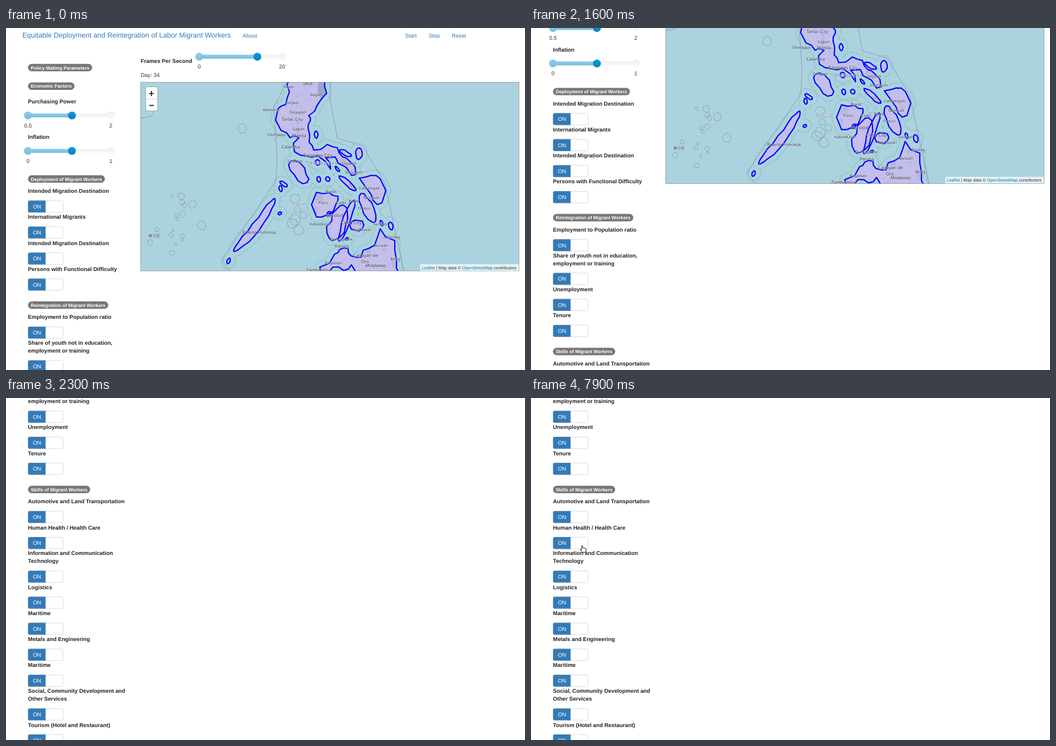
Recreate the animation shown at these times as an HTML page. Size 921 by 608 pixels, loop 8000 ms.

```html
<!DOCTYPE html>
<html lang="en">
<head>
<meta charset="utf-8">
<title>Labor Migration Dashboard</title>
<style>
html, body { margin: 0; width: 100%; height: 100%; overflow: hidden; background: #fff; }
svg { display: block; width: 921px; height: 608px; font-family: "Liberation Sans", Arial, sans-serif; text-rendering: geometricPrecision; }
.map text { font-family: "Noto Sans", "Noto Sans CJK SC", "Noto Sans CJK", sans-serif; }
</style>
</head>
<body>
<svg viewBox="0 0 921 608">
  <defs>
    <linearGradient id="track" x2="0" y2="1"><stop stop-color="#f0f0f0"/><stop offset="1" stop-color="#f9f9f9"/></linearGradient>
    <linearGradient id="range" x2="0" y2="1"><stop stop-color="#89cdef"/><stop offset="1" stop-color="#81bcda"/></linearGradient>
    <linearGradient id="knob" x2="0" y2="1"><stop stop-color="#149bdf"/><stop offset="1" stop-color="#0480be"/></linearGradient>
    <clipPath id="frame"><rect x="239" y="96.5" width="671.3" height="335.4"/></clipPath>
    <clipPath id="switch"><rect width="62.6" height="21.2" rx="2.8"/></clipPath>
  </defs>
  <g id="page"></g>
  <path id="arrow" d="M.5 .5V12L3.2 9.5 5.2 14 7.2 13.1 5.2 8.9H9Z" fill="#fff" stroke="#111"/>
  <path id="hand" d="M3.4 8V1.4Q3.4.5 4.3.5T5.3 1.4V4.6Q6.8 4 7.3 5 8.7 4.5 9.3 5.5 10.8 5 11.4 6.3V9.2L10.3 12.6H4.5L.8 8.2Q.5 6.8 1.8 7Z" fill="#fff" stroke="#111"/>
</svg>
<script>
const NS = "http://www.w3.org/2000/svg";
const page = document.getElementById("page");

function el(parent, tag, attrs, content) {
  const n = document.createElementNS(NS, tag);
  for (const k in attrs) n.setAttribute(k, attrs[k]);
  if (content !== undefined) n.textContent = content;
  parent.appendChild(n);
  return n;
}
// Text placed by the vertical middle of its capitals
function text(parent, str, x, mid, size = 9.8, attrs = {}) {
  return el(parent, "text", { x, y: mid + size * 0.34, "font-size": size, fill: "#333", ...attrs }, str);
}
const bold = (str, x, mid) => text(page, str, x, mid, 9.8, { "font-weight": 700, fill: "#222" });
const link = (str, x, size = 9.8) => text(page, str, x, 13.2, size, { fill: "#337ab7" });

function badge(str, mid) {
  const r = el(page, "rect", { x: 39, y: mid - 6.6, height: 13.2, rx: 6.6, fill: "#777" });
  const t = text(page, str, 44, mid + 0.3, 8.4, { "font-weight": 700, fill: "#fff" });
  r.setAttribute("width", t.getComputedTextLength() + 10);
}
function slider(x, mid, value, lo, hi) {
  const bar = (width, fill) => el(page, "rect", { x, y: mid - 3.5, width, height: 7, rx: 2.8, fill });
  const dot = (dx, fill) => el(page, "circle", { cx: x + dx, cy: mid, r: 7, fill });
  const mark = (s, dx) => text(page, s, x + dx, mid + 18, 9.8, { "text-anchor": "middle" });
  bar(147, "url(#track)");
  bar(value, "url(#range)");
  dot(0, "url(#range)");
  dot(147, "url(#track)");
  dot(value, "url(#knob)");
  mark(lo, 0);
  mark(hi, 147);
}
function toggle(mid) {
  const box = el(page, "g", { transform: `translate(39.1 ${mid - 10.6})` });
  const strip = el(el(box, "g", { "clip-path": "url(#switch)" }), "g", {});
  ["#337ab7", "#fff", "#e6e6e6"].forEach((fill, i) => el(strip, "rect", { x: 31.4 * i, width: 31.4, height: 21.2, fill }));
  ["ON", "", "OFF"].forEach((s, i) => text(strip, s, 31.4 * i + 15.9, 10.7, 9.8, { fill: i ? "#333" : "#fff", "text-anchor": "middle" }));
  el(box, "rect", { x: 0.35, y: 0.35, width: 61.9, height: 20.5, rx: 2.5, fill: "none", stroke: "#ccc", "stroke-width": 0.7 });
  const edge = el(box, "path", { d: "M31.4 .35H2.8Q.35 .35 .35 2.8V18.4Q.35 20.85 2.8 20.85H31.4", fill: "none", stroke: "#2e6da4", "stroke-width": 0.7 });
  return off => {
    strip.setAttribute("transform", `translate(${-31.4 * off} 0)`);
    edge.setAttribute("opacity", off ? 0 : 1);
  };
}
// Stacked labels with a switch under each; "|" breaks a label in two lines
function rows(y, labels) {
  return labels.map(label => {
    const lines = label.split("|"), extra = lines.length - 1;
    lines.forEach((s, i) => bold(s, 39, y + i * 14 - extra * 0.4));
    y += extra * 13.6 + 46.25;
    return toggle(y - 18.7);
  });
}

/* Header and controls */
link("Equitable Deployment and Reintegration of Labor Migrant Workers", 29, 12.55);
link("About", 420);
link("Start", 708);
link("Step", 750);
link("Reset", 791);
bold("Frames Per Second", 239, 58.7);
slider(343, 51, 103, "0", "20");
text(page, "Day: 34", 239, 83.3);

badge("Policy Making Parameters", 70.4);
badge("Economic Factors", 103.3);
bold("Purchasing Power", 39, 131);
slider(39, 155.5, 78, "0.5", "2");
bold("Inflation", 39, 194);
slider(39, 218.5, 78, "0", "1");
badge("Deployment of Migrant Workers", 268.4);
rows(289.8, ["Intended Migration Destination", "International Migrants", "Intended Migration Destination", "Persons with Functional Difficulty"]);
badge("Reintegration of Migrant Workers", 492.6);
rows(514, ["Employment to Population ratio", "Share of youth not in education,|employment or training", "Unemployment", "Tenure"]);
badge("Skills of Migrant Workers", 730.6);
const skills = rows(752, ["Automotive and Land Transportation", "Human Health / Health Care", "Information and Communication|Technology", "Logistics", "Maritime", "Metals and Engineering", "Maritime", "Social, Community Development and|Other Services", "Tourism (Hotel and Restaurant)"]);

/* Coastlines */
let seed = 11;
const rnd = () => (seed = (seed * 16807) % 2147483647) / 2147483647;
const jit = size => (rnd() - 0.5) * size;
const ring = pts => "M" + pts.map(p => p.map(v => v.toFixed(1)).join(" ")).join("L") + "Z";

// Closed outline through key points, each side broken once by a random kink
function coast(keys) {
  const n = keys.match(/\d+/g).map(Number), pts = [];
  for (let i = 0; i < n.length; i += 2) {
    const [x, y, u, v] = [0, 1, 2, 3].map(k => n[(i + k) % n.length]), k = jit(0.4);
    pts.push([x, y], [(x + u) / 2 + (v - y) * k, (y + v) / 2 - (u - x) * k]);
  }
  return ring(pts);
}
// Ragged lens from one tip to the other, bowed sideways
function isle(x, y, u, v, width, bow = 0) {
  const len = Math.hypot(u - x, v - y), n = 6 + 2 * Math.round(len / 14), pts = [];
  for (let i = 0; i < n; i++) {
    const a = i * 2 * Math.PI / n, s = (1 - Math.cos(a)) / 2;
    const side = Math.sin(a) * width / 2 * (1 + jit(0.5)) + bow * Math.sin(s * Math.PI);
    pts.push([x + (u - x) * s - (v - y) / len * side, y + (v - y) * s + (u - x) / len * side]);
  }
  return ring(pts);
}
const north = coast("503 90 503 113 496 136 483 143 488 182 504 195 510 192 520 195 510 205 512 220 533 228 553 227 576 251 567 230 584 229 589 240 613 262 621 260 610 237 597 229 588 213 570 207 558 216 546 217 538 203 536 178 540 165 537 156 553 136 569 116 566 90");
const mindoro = isle(505, 237, 534, 275, 23);
const panay = coast("551 292 574 293 589 299 586 312 568 333 551 336");
const negros = isle(599, 315, 578, 378, 29);
const samar = coast("627 267 648 262 664 268 667 311 659 314 648 296");
const south = coast("556 440 557 425 583 402 592 394 607 392 612 405 630 408 634 395 654 386 664 357 690 378 693 412 700 440 626 440 613 421 599 431 580 425");
const slim = [
  isle(404, 397, 477, 303, 15, 5), isle(393, 419, 397, 409, 5), isle(486, 273, 499, 282, 7), isle(487, 280, 488, 291, 6), isle(483, 331, 489, 328, 5),
  isle(550, 183, 551, 196, 6), isle(553, 234, 553, 244, 9), isle(627, 213, 625, 234, 11), isle(592, 217, 613, 228, 8), isle(584, 246, 592, 255, 4),
  isle(554, 264, 556, 274, 6), isle(567, 268, 575, 269, 8), isle(591, 263, 621, 289, 9), isle(681, 345, 685, 359, 7), isle(665, 342, 668, 352, 5),
  isle(630, 294, 654, 346, 18), isle(618, 306, 591, 379, 13), isle(610, 351, 635, 350, 19), isle(570, 333, 576, 327, 6), isle(602, 375, 608, 375, 5)];
const land = [north, mindoro, panay, negros, samar, south, ...slim].join("");

/* Map */
el(page, "rect", { x: 239, y: 96.5, width: 671.3, height: 335.4, fill: "#aad3df" });
const map = el(page, "g", { class: "map", "clip-path": "url(#frame)" });
const shape = (d, stroke, width = 1, attrs = {}) =>
  el(map, "path", { d, fill: "none", stroke, "stroke-width": width, "stroke-linejoin": "round", ...attrs });

// Coastal zones, outer boundary, reefs
shape(land, "#93a9b7", 19);
shape(land, "#a9d3dd", 17.6);
shape("M499 92L475 143 481 230 479 272 388 405 384 415 402 436M577 92L574 120 588 196 632 209 672 275 707 436M239 160L257 157 262 150", "#9a94ad");
const reef = (x, y, r) => shape(isle(x - r, y, x + r, y, r * 2), "#92a0b1");
reef(419, 179, 8);
reef(347, 351, 8);
reef(331, 313, 7);
for (let i = 0; i < 7; i++) reef(306 + jit(36), 320 + jit(44), 3 + rnd() * 3);
for (let i = 0; i < 8; i++) reef(285 + jit(70), 382 + jit(50), 1 + rnd() * 4);
for (let i = 0; i < 6; i++) reef(515 + jit(50), 330 + jit(120), 5 + rnd() * 5);

// Land with relief, borders and roads
shape(land, "none", 0, { fill: "#c3bfec" });
el(el(map, "clipPath", { id: "land" }), "path", { d: land });
const inner = el(map, "g", { "clip-path": "url(#land)" });
const place = () => [485 + rnd() * 210, 97 + rnd() * 335];
for (let i = 0; i < 34; i++) {
  const [cx, cy] = place();
  el(inner, "ellipse", { cx, cy, rx: 3 + rnd() * 5, ry: 3 + rnd() * 9, fill: i % 2 ? "#aeb5d8" : "#cdbff0", opacity: 0.6 });
}
el(inner, "ellipse", { cx: 561, cy: 108, rx: 8, ry: 17, fill: "#9aa5cb" });
for (let i = 0; i < 120; i++) {
  let d = "M" + place().join(" ");
  for (let j = 0; j < 4; j++) d += `l${jit(16)} ${jit(16)}`;
  el(inner, "path", { d, fill: "none", stroke: i % 3 ? "#a493cf" : "#c19bd6", "stroke-width": 0.7, opacity: 0.7 });
}
shape(land, "#00f", 2.2);

// Place names
const label = (str, x, y, size = 7, attrs = {}) => text(map, str, x, y, size, {
  fill: "#2b2b38", "text-anchor": "middle", stroke: "#fff", "stroke-opacity": 0.5, "stroke-width": 1.2, "paint-order": "stroke", ...attrs });
const towns = "Vigan 502 105,Tabuk 535 99,Ilagan 550 119,Baguio 508 133,Alaminos 471 146,Dagupan 518 150,Gapan 519 180,Olongapo 480 190,Calapan 513 237,Legazpi 609 241,Sorsogon 617 257,Roxas 577 291,Catbalogan 645 285,Tacloban 648 302,Passi 563 311,Cadiz 595 311,Bogo 617 308,Ormoc 636 321,Kabankalan 558 349,Tagbilaran 632 359,Surigao 664 349,Dumaguete 595 376,Dipolog 596 388,Tandag 687 372,Butuan 666 387,Bislig 691 411,Pagadian 581 418";
for (const town of towns.split(",")) label(...town.split(" ").map((s, i) => i ? +s : s));
const city = (str, x, y) => label(str, x, y, 8);
city("Tarlac City", 508, 162);
city("Manila", 520, 191);
city("Calamba", 505, 211);
city("Batangas City", 553, 226);
city("Bacolod", 583, 333);
city("Cebu City", 613, 346);
city("Puerto Princesa", 449, 363);
city("Cagayan de", 638, 404);
city("Oro", 637, 415);
city("Zamboanga", 555, 430);
label("Philippines", 564, 240, 8, { fill: "#77698f", "letter-spacing": 0.6 });
label("Palawan", 519, 313, 6.6, { fill: "#817b91", "font-style": "italic" });
label("Mindanao", 656, 422, 8, { "font-style": "italic", "font-weight": 500 });
label("南沙区", 263, 369.5);
el(page, "rect", { x: 238.9, y: 96.5, width: 671.3, height: 335.4, fill: "none", stroke: "#808080", "stroke-width": 0.7 });

// Zoom buttons and credit line
el(page, "rect", { x: 247.3, y: 104, width: 22.4, height: 44, rx: 2.8, fill: "#8fa9b1" });
el(page, "rect", { x: 248.4, y: 105.1, width: 20.2, height: 41.8, rx: 1.8, fill: "#fff" });
el(page, "path", { d: "M248.4 126.4H268.6", stroke: "#ccc", "stroke-width": 0.8 });
el(page, "path", { d: "M253.8 116.5H262.6M258.2 112.1V120.9M254.2 137.7H262.3", stroke: "#111", "stroke-width": 1.7 });
el(page, "rect", { x: 735, y: 420, width: 175, height: 11.7, fill: "#fff", opacity: 0.7 });
const credit = text(page, "", 738, 426, 7.7);
["Leaflet", " | Map data © ", "OpenStreetMap", " contributors"]
  .forEach((s, i) => el(credit, "tspan", { fill: i % 2 ? "#333" : "#0078a8" }, s));

/* Motion, sampled ten times a second */
const clamp = v => Math.min(1, Math.max(0, v));
const span = (t, from, to) => clamp((t - from) / (to - from));
const ease = p => p < 0.5 ? 4 * p ** 3 : 1 - 4 * (1 - p) ** 3;
// First wheel notch, then one long glide that speeds up at the end
const scrollAt = t => 38 * ease(span(t, 600, 900)) + 11.7 * span(t, 1300, 1400)
  + 105.7 * span(t, 1400, 1600) + 203.3 * span(t, 1600, 2000) + 209.3 * span(t, 2000, 2300);
const offAt = t => span(t, 6000, 6400) - span(t, 6400, 6800);
const pointer = [[4600, "arrow", 97, 192.4], [4800, "hand", 93, 201.5], [5200, "hand", 87, 218.5], [6200, "hand", 88, 207], [6600, "hand", 87, 243], [6900, "hand", 87, 246], [7900, "hand", 86.5, 261.8]];
const cursors = ["arrow", "hand"].map(id => document.getElementById(id));

function draw() {
  const t = Math.floor(performance.now() % 8000 / 100) * 100;
  page.setAttribute("transform", `translate(0 ${-scrollAt(t)})`);
  // The switch repaints only every 200 ms
  skills[0](offAt(t - t % 200));
  const [, shape, x, y] = pointer.filter(p => p[0] <= t).pop() || [];
  for (const c of cursors) {
    c.setAttribute("visibility", c.id === shape ? "visible" : "hidden");
    if (c.id === shape) c.setAttribute("transform", `translate(${x} ${y})`);
  }
  requestAnimationFrame(draw);
}
draw();
</script>
</body>
</html>
```
